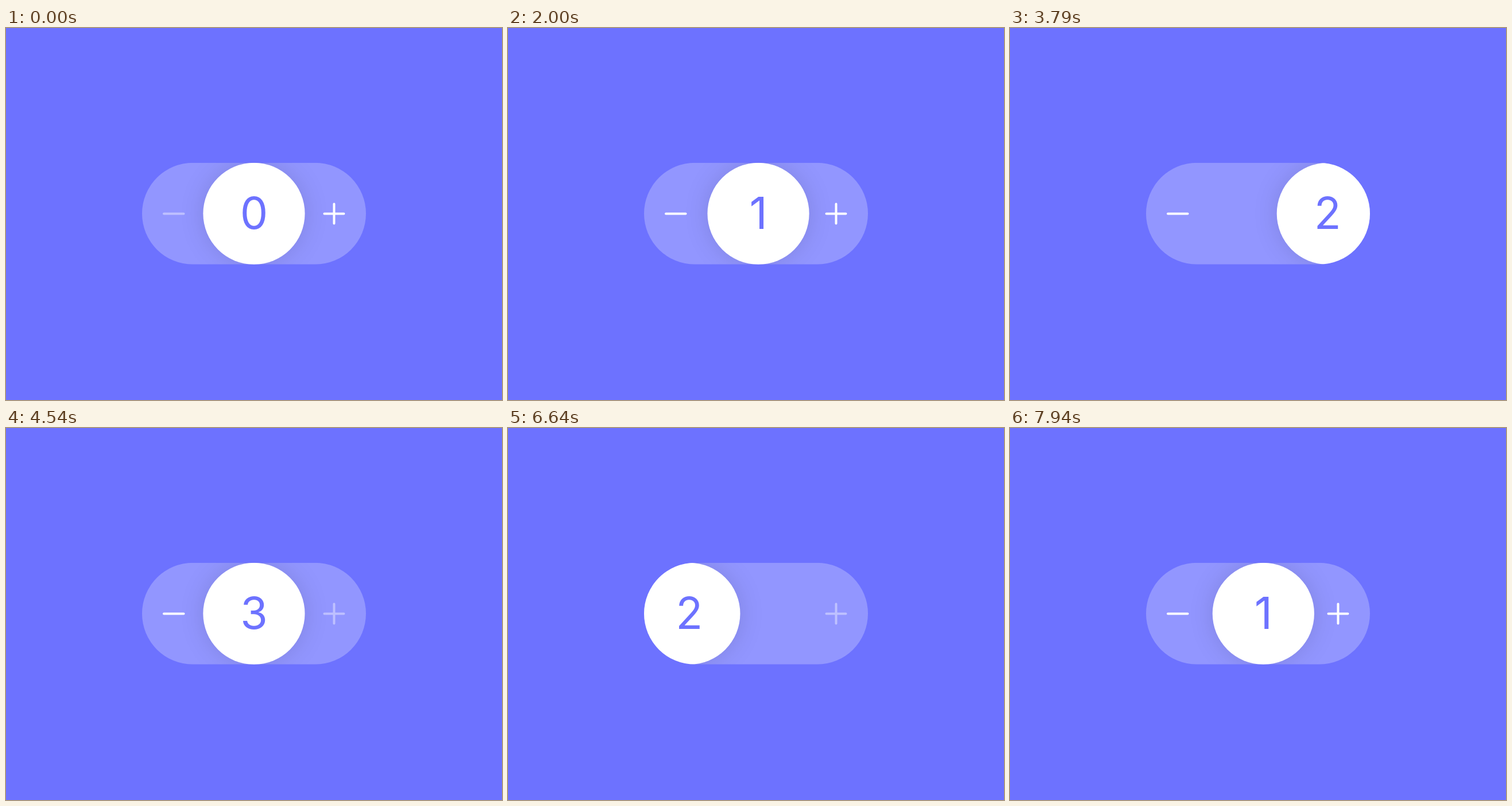
An HTML page for the animation above (8000 ms loop, 864 px wide and 648 px high).

```html
<!DOCTYPE html>
<html lang="en">
<head>
<meta charset="utf-8">
<title>Stepper</title>
<style>
  html, body { margin: 0; height: 100%; overflow: hidden; background: #6d72ff; }
  svg { display: block; }
  .icon { stroke: #fff; stroke-width: 4; stroke-linecap: round; fill: none; }
  .knob { fill: #fff; filter: drop-shadow(0 0 20px rgba(0, 0, 0, .12)); }
  text { font: 400 77px Inter, sans-serif; fill: #6d72ff; text-anchor: middle; }
</style>
</head>
<body>
<svg width="864" height="648" viewBox="0 0 864 648">
  <clipPath id="pill"><rect x="237" y="234.8" width="390" height="177" rx="88.5"/></clipPath>
  <g clip-path="url(#pill)">
    <rect x="237" y="234.8" width="390" height="177" fill="#fff" fill-opacity=".25"/>
    <path class="icon" id="minus" d="M275 323.4h34.5"/>
    <path class="icon" id="plus" d="M554.5 323.4h34M571.5 306.4v34"/>
    <g id="slider">
      <circle class="knob" cx="432" cy="323.3" r="88.6"/>
      <text id="digit" x="432" y="350.3">0</text>
    </g>
  </g>
</svg>
<script>
  const LOOP = 8000, DIM = 0.4, FADE = 420;
  const DRAG_LEAD = 40, DRAG_TIME = 380, RELEASE = 432;
  const HALF_PERIOD = 180, DAMPING = 0.72;

  // Each drag: start time, furthest offset, change of the value, release delay
  const drags = [
    { start: 630, reach: 125, step: 1 },
    { start: 2000, reach: 125, step: 1 },
    { start: 3490, reach: 125, step: 1 },
    { start: 5140, reach: 23, step: 0, release: 468 },
    { start: 6190, reach: -125, step: -1 },
    { start: 7360, reach: -125, step: -1 },
  ];

  const [minus, plus, slider, digit] =
    ['minus', 'plus', 'slider', 'digit'].map(id => document.getElementById(id));

  const smooth = x => {
    const u = Math.min(1, Math.max(0, x));
    return u * u * (3 - 2 * u);
  };

  // Underdamped spring, from 1 at rest to 0
  const spring = t => {
    const a = Math.PI * t / HALF_PERIOD;
    return Math.exp(-DAMPING * a) * (Math.cos(a) + DAMPING * Math.sin(a));
  };

  const releaseTime = d => d.start + (d.release || RELEASE);

  const offset = (d, t) => d.reach * (t < releaseTime(d)
    ? smooth((t - d.start + DRAG_LEAD) / DRAG_TIME)
    : spring(t - releaseTime(d)));

  const fade = (d, t) => smooth((t - releaseTime(d)) / FADE);

  function draw(now) {
    const t = now % LOOP;
    const x = drags.reduce((sum, d) => sum + offset(d, t), 0);
    const value = drags.reduce((sum, d) => sum + (t >= releaseTime(d) ? d.step : 0), 0);
    slider.setAttribute('transform', `translate(${x.toFixed(2)} 0)`);
    digit.textContent = value;
    minus.style.opacity = DIM + (1 - DIM) * fade(drags[0], t);
    plus.style.opacity = 1 - (1 - DIM) * (fade(drags[2], t) - fade(drags[4], t));
    requestAnimationFrame(() => draw(performance.now()));
  }
  draw(0);
</script>
</body>
</html>
```
